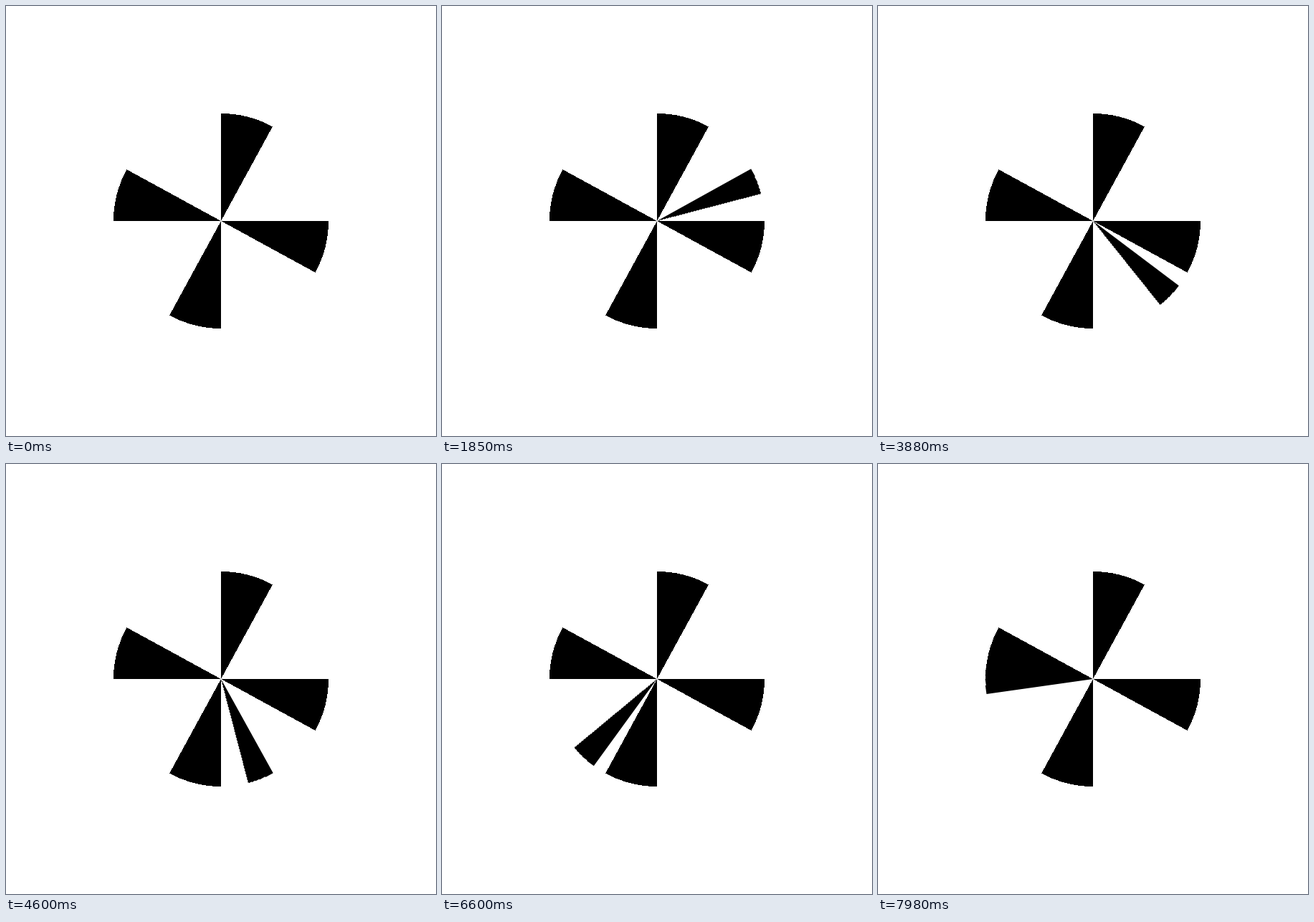
Recreate the animation shown at these times as an HTML page. Size 600 by 600 pixels, loop 8000 ms.

```html
<!DOCTYPE html>
<html lang="en">
<head>
<meta charset="utf-8">
<title>Pinwheel</title>
<style>
  html, body { margin: 0; width: 100%; height: 100%; overflow: hidden; background: #fff; }
  svg { display: block; width: 100%; height: 100%; shape-rendering: crispEdges; }

  /* One degree every 30 ms, slightly slower while hidden behind a blade. */
  #sweep {
    transform-origin: 0 0;
    animation: sweep 8000ms -2ms infinite;
  }
  @keyframes sweep {
    0%      { transform: rotate(0deg);   animation-timing-function: steps(15); }
    5.875%  { transform: rotate(15deg);  animation-timing-function: steps(75); }
    34%     { transform: rotate(90deg);  animation-timing-function: steps(15); }
    40.25%  { transform: rotate(105deg); animation-timing-function: steps(75); }
    68.375% { transform: rotate(180deg); animation-timing-function: steps(15); }
    74.625% { transform: rotate(195deg); animation-timing-function: steps(67); }
    99.75%, 100% { transform: rotate(262deg); }
  }
</style>
</head>
<body>
<svg viewBox="-300 -300 600 600">
  <defs>
    <!-- Sectors of radius 150 spanning 0.5 and 0.25 radians -->
    <path id="blade" d="M0 0V-150A150 150 0 0 1 71.914 -131.637Z"/>
  </defs>
  <use href="#blade"/>
  <use href="#blade" transform="rotate(90)"/>
  <use href="#blade" transform="rotate(180)"/>
  <use href="#blade" transform="rotate(270)"/>
  <path id="sweep" d="M0 0V-150A150 150 0 0 1 37.111 -145.337Z"/>
</svg>
</body>
</html>
```
